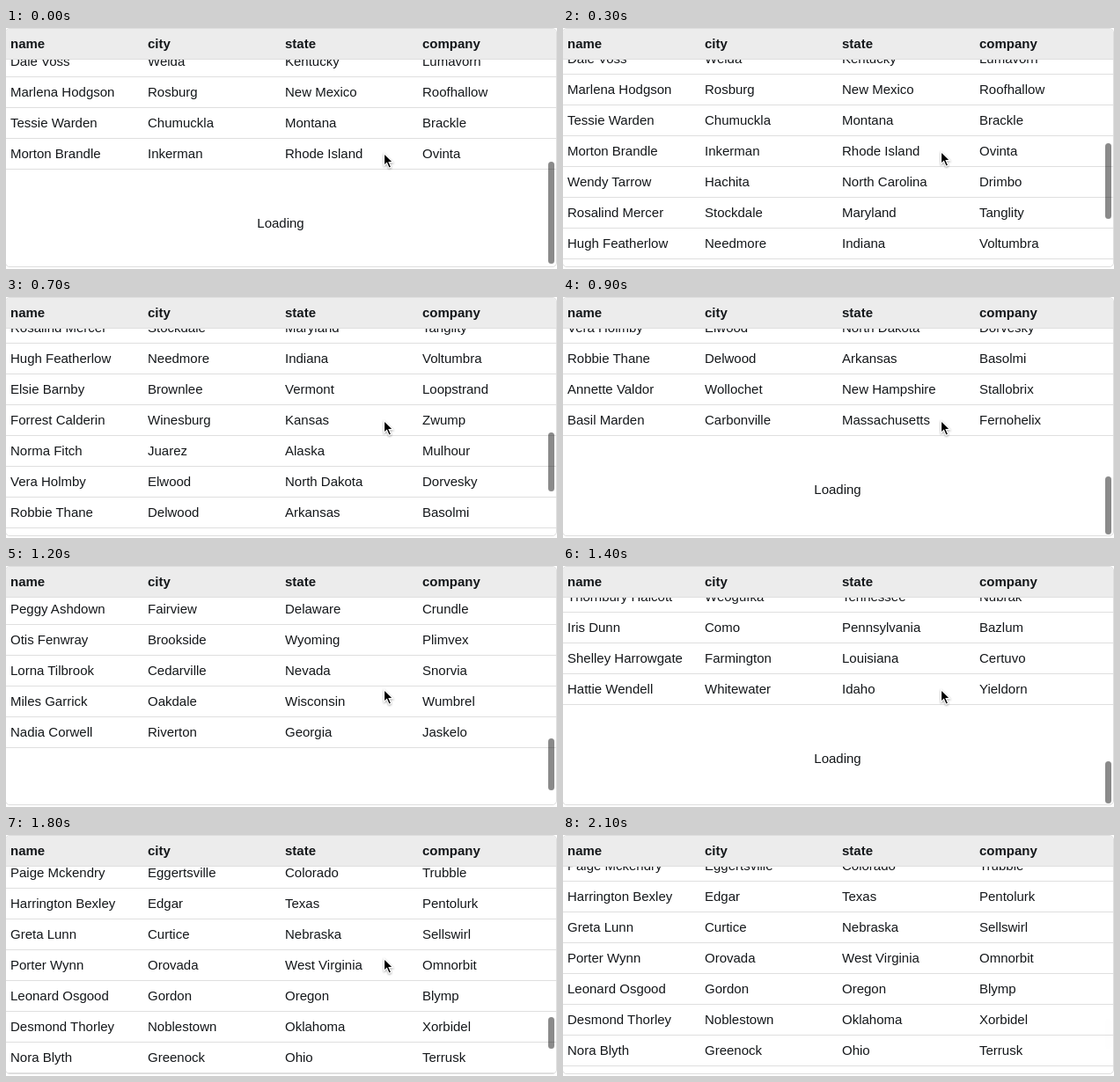
An HTML page that plays this animation: 626 by 274 pixels, repeating every 2.4 s.

```html
<!DOCTYPE html>
<html lang="en">
<head>
<meta charset="utf-8">
<title>Infinite scroll table</title>
<style>
  html, body { margin: 0; width: 100%; height: 100%; overflow: hidden; background: #fff; }
  #stage { position: relative; width: 626px; height: 274px; overflow: hidden; }
  #table {
    position: absolute; left: -1px; top: 0; width: 627px; height: 272px;
    box-sizing: border-box; border: 1px solid #ddd; border-radius: 5px; overflow: hidden;
    font: 15px/34px "Liberation Sans", Arial, Helvetica, sans-serif; color: #14171a;
  }
  .row { position: relative; height: 34px; border-bottom: 1px solid #dfdfdf; white-space: nowrap; }
  .row span { position: absolute; top: 0; }
  .head { z-index: 1; background: #ececec; font-weight: bold; }
  #body { position: absolute; left: 0; top: 20px; width: 100%; }
  #loading { width: 624px; line-height: 122px; text-align: center; }
  #thumb { position: absolute; left: 616px; width: 7px; border-radius: 3.5px; background: #000; }
  #cursor { position: absolute; left: 427px; filter: drop-shadow(0 1px 1px rgba(0, 0, 0, .35)); }
</style>
</head>
<body>
<div id="stage">
  <div id="table">
    <div id="body"></div>
  </div>
  <div id="thumb"></div>
  <svg id="cursor" width="16" height="22" viewBox="-2 -2 16 22">
    <path d="M0.5 0.5V14.4L3.6 11.6L6.1 17.2L8.6 16.1L6.2 10.6H10.6Z" fill="#000" stroke="#fff" stroke-width="1.2"/>
  </svg>
</div>
<script>
const STEP = 100, LOOP = 2400, LAST = 21;
const COLUMN = 156, ROW = 35, PAGE = 10, FIRST_ROWS = 4;
const VIEW = 231, TRACK_TOP = 37, TRACK = 233;
const CONTENT = 464, SCROLLED = 226; // height and offset when the loop starts

const records = `Dale Voss,Welda,Kentucky,Lumavorn
Marlena Hodgson,Rosburg,New Mexico,Roofhallow
Tessie Warden,Chumuckla,Montana,Brackle
Morton Brandle,Inkerman,Rhode Island,Ovinta
Wendy Tarrow,Hachita,North Carolina,Drimbo
Rosalind Mercer,Stockdale,Maryland,Tanglity
Hugh Featherlow,Needmore,Indiana,Voltumbra
Elsie Barnby,Brownlee,Vermont,Loopstrand
Forrest Calderin,Winesburg,Kansas,Zwump
Norma Fitch,Juarez,Alaska,Mulhour
Vera Holmby,Elwood,North Dakota,Dorvesky
Robbie Thane,Delwood,Arkansas,Basolmi
Annette Valdor,Wollochet,New Hampshire,Stallobrix
Basil Marden,Carbonville,Massachusetts,Fernohelix
Peggy Ashdown,Fairview,Delaware,Crundle
Otis Fenwray,Brookside,Wyoming,Plimvex
Lorna Tilbrook,Cedarville,Nevada,Snorvia
Miles Garrick,Oakdale,Wisconsin,Wumbrel
Nadia Corwell,Riverton,Georgia,Jaskelo
Edwin Straker,Mapleton,Utah,Frindolt
Thornbury Halcott,Weogufka,Tennessee,Nubrak
Iris Dunn,Como,Pennsylvania,Bazlum
Shelley Harrowgate,Farmington,Louisiana,Certuvo
Hattie Wendell,Whitewater,Idaho,Yieldorn
Mason Tilney,Idledale,Michigan,Hoglume
Paige Mckendry,Eggertsville,Colorado,Trubble
Harrington Bexley,Edgar,Texas,Pentolurk
Greta Lunn,Curtice,Nebraska,Sellswirl
Porter Wynn,Orovada,West Virginia,Omnorbit
Leonard Osgood,Gordon,Oregon,Blymp
Desmond Thorley,Noblestown,Oklahoma,Xorbidel
Nora Blyth,Greenock,Ohio,Terrusk
Alma Kerrow,Linden,Maine,Quibbor
Ivor Selby,Hillsboro,Iowa,Drovanti`.split("\n").map(line => line.split(","));

// times are in steps
const flicks = [
  { at: 0, length: 1, by: 3 },
  { at: 3, length: 2.4, by: 175 },
  { at: 7, length: 2, by: 175 },
  { at: 11.5, length: 2.5, by: 350 },
  { at: 15, length: 3.8, by: 175 }
];
const loads = [-Infinity, 2, 11.5, 15];

const $ = id => document.getElementById(id);
const [body, thumb, cursor] = ["body", "thumb", "cursor"].map($);
const clamp = x => Math.max(0, Math.min(1, x));
const mix = (a, b, t) => a + (b - a) * t;
const easeOut = t => 1 - (1 - clamp(t)) ** 2;
const show = (el, on) => el.style.display = on ? "" : "none";

function makeRow(cells, extra = "") {
  const row = document.createElement("div");
  row.className = "row " + extra;
  cells.forEach((text, i) => {
    const cell = document.createElement("span");
    cell.textContent = text;
    cell.style.left = 5 + i * COLUMN + "px";
    row.append(cell);
  });
  return row;
}

$("table").prepend(makeRow(["name", "city", "state", "company"], "head"));
const rows = records.map(cells => makeRow(cells));
const loading = document.createElement("div");
loading.id = "loading";
loading.textContent = "Loading";
body.append(...rows, loading);

const scrollAt = k => Math.round(
  flicks.reduce((sum, f) => sum + f.by * easeOut((k - f.at) / f.length), 0));

const thumbSize = page => TRACK * VIEW / (CONTENT + page * PAGE * ROW);

// the thumb fades once the latest flick has come to rest
function thumbOpacity(k) {
  const flick = flicks.filter(f => f.at <= k).pop();
  const idle = Math.max(0, k - flick.at - flick.length);
  return .46 * clamp(1 - .45 * idle);
}

// after a load the thumb glides from the end of the track to its new place
function drawThumb(k, page, age, scroll) {
  const lag = .4 ** age;
  const size = mix(thumbSize(page), thumbSize(page - 1), lag);
  const range = CONTENT - 235 + page * PAGE * ROW;
  const place = mix((SCROLLED + scroll) / range, 1, lag);
  thumb.style.top = Math.round(TRACK_TOP + place * (TRACK - size)) + "px";
  thumb.style.height = Math.round(size) + "px";
  thumb.style.opacity = thumbOpacity(k);
}

function draw(k) {
  const scroll = scrollAt(k);
  const page = loads.filter(at => at <= k).length - 1;
  const age = k - loads[page];
  const fresh = age < 1.2; // a new page renders in two halves
  const count = FIRST_ROWS + page * PAGE - (fresh ? PAGE / 2 : 0);
  rows.forEach((row, i) => show(row, i < count));
  show(loading, !fresh);
  body.style.top = 20 - scroll + "px";
  drawThumb(k, page, age, scroll);
  cursor.style.top = 140 - Math.min(scroll, 2) + "px";
  show(cursor, k < LAST);
}

const start = performance.now();
let shown = -1;
function tick() {
  const time = (performance.now() - start) % LOOP;
  const k = Math.min(Math.floor(time / STEP), LAST);
  if (k !== shown) draw(shown = k);
  requestAnimationFrame(tick);
}
tick();
</script>
</body>
</html>
```
